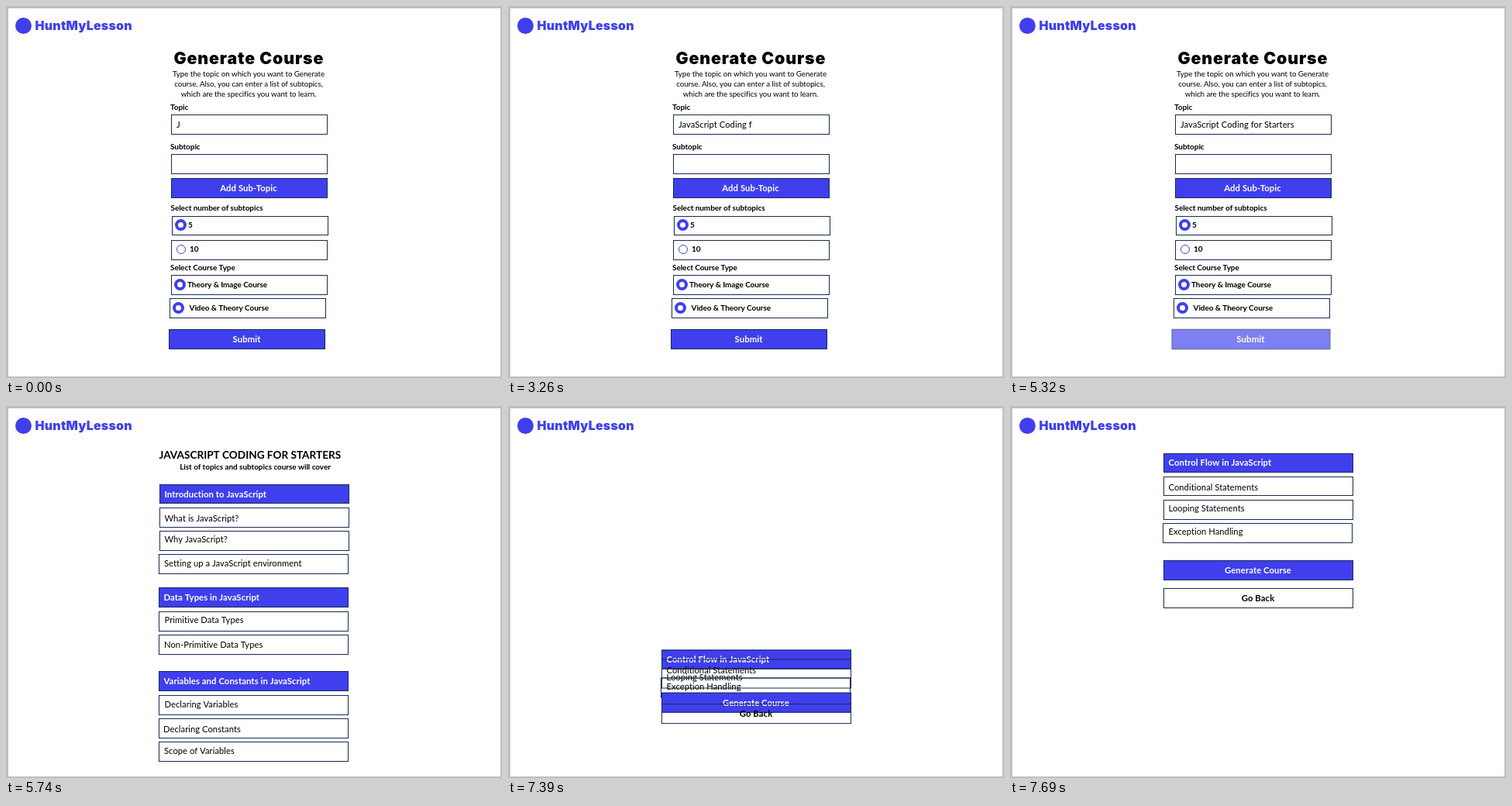
Write an HTML page with a canvas that moves like this. It is 640 by 480 pixels and loops after 8000 ms.

```html
<!DOCTYPE html>
<html lang="en">
<head>
<meta charset="utf-8">
<title>Course generator</title>
<style>
  html, body { margin: 0; width: 100%; height: 100%; overflow: hidden; background: #fff; }
  canvas { display: block; width: 640px; height: 480px; }
</style>
</head>
<body>
<canvas id="stage" width="640" height="480"></canvas>
<script>
const ctx = document.getElementById('stage').getContext('2d');
const LOOP = 8000;
const BLUE = '#3f3fee', NAVY = '#172c51', GREY = '#bfbfbf';
const BODY = 'Lato, sans-serif', HEAVY = 'Inter, sans-serif';
// Font and letter spacing
const FONT = {
  brand: ['900 16px ' + HEAVY, 0.2],
  heading: ['900 21.3px ' + HEAVY, 0.9],
  item: ['11.2px ' + BODY, 0.05],
  note: ['9.75px ' + BODY, -0.05],
  bold: ['bold 11.3px ' + BODY, 0.08],
  label: ['bold 10px ' + BODY, -0.06],
  title: ['bold 13.6px ' + BODY, 0]
};
const TOPIC = 'JavaScript Coding for Starters';

function text(str, x, y, font, color = '#000', align = 'left') {
  const [face, spacing] = FONT[font];
  ctx.font = face;
  ctx.letterSpacing = spacing + 'px';
  ctx.fillStyle = color;
  ctx.textAlign = align;
  ctx.fillText(str, x, y);
}

function box(x, y, w, h, fill) {
  if (fill) {
    ctx.fillStyle = fill;
    ctx.fillRect(x, y, w, h);
  }
  ctx.strokeStyle = NAVY;
  ctx.lineWidth = 1;
  ctx.strokeRect(x + 0.5, y + 0.5, w - 1, h - 1);
}

function ring(x, y, r, width) {
  ctx.strokeStyle = BLUE;
  ctx.lineWidth = width;
  ctx.beginPath();
  ctx.arc(x, y, r, 0, Math.PI * 2);
  ctx.stroke();
}

function page() {
  ctx.fillStyle = GREY;
  ctx.fillRect(0, 0, 640, 480);
  ctx.fillStyle = '#fff';
  ctx.fillRect(3, 3, 635, 475);
  ctx.fillStyle = BLUE;
  ctx.beginPath();
  ctx.arc(22.5, 25.5, 10.5, 0, Math.PI * 2);
  ctx.fill();
  text('HuntMyLesson', 37.5, 31, 'brand', BLUE);
}

// The first n letters of the topic; spaces come along for free.
function typed(n) {
  return TOPIC.match(new RegExp('(\\s*\\S){' + n + '}'))[0];
}

// One pulse: quick fade to half, hold, back, with a slight swell.
function submit(phase) {
  const fade = 0.5 * Math.min(1, phase / 0.2, (1 - phase) / 0.2);
  const scale = 1 + 0.05 * (1 - Math.abs(1 - 2 * phase));
  ctx.save();
  ctx.translate(311, 430);
  ctx.scale(scale, scale);
  ctx.translate(-311, -430);
  box(210, 417, 202, 26, BLUE);
  text('Submit', 310.5, 434, 'bold', '#fff', 'center');
  ctx.restore();
  ctx.fillStyle = `rgba(255,255,255,${fade})`;
  ctx.fillRect(200, 412, 222, 36);
}

function form(t) {
  text('Generate Course', 313.4, 75, 'heading', '#000', 'center');
  ['Type the topic on which you want to Generate',
   'course. Also, you can enter a list of subtopics,',
   'which are the specifics you want to learn.'
  ].forEach((line, i) => text(line, 313, 91 + 13 * i, 'note', '#000', 'center'));

  text('Topic', 212, 134, 'label');
  box(213, 140, 202, 26);
  text(typed(Math.max(1, Math.min(27, Math.floor((t - 260) / 200) + 2))), 220, 157, 'item');
  text('Subtopic', 212, 185, 'label');
  box(213, 191, 202, 26);
  box(213, 222, 202, 26, BLUE);
  text('Add Sub-Topic', 313, 239, 'bold', '#fff', 'center');

  text('Select number of subtopics', 212.5, 264, 'label');
  box(214, 271, 202, 25);
  ring(225.5, 282.5, 5.5, 4);
  text('5', 235, 286, 'label');
  box(213, 302, 202, 26);
  ring(226, 314, 5.5, 1);
  text('10', 237, 317, 'label');

  text('Select Course Type', 212, 341, 'label');
  box(213, 347, 202, 26);
  ring(224.5, 359.5, 5.5, 4);
  text('Theory & Image Course', 234, 363, 'label');
  box(211, 377, 202, 26);
  ring(222.5, 389.5, 5.5, 4);
  text('Video & Theory Course', 236.5, 393, 'label');

  submit(Math.max(0, Math.floor((t - 5260) / 60)) / 7.5);
}

// Rows: text, box left, box top, box height, text x, baseline, filled
const OUTLINE = [
  ['Introduction to JavaScript', 198, 101, 25, 204.5, 118, true],
  ['What is JavaScript?', 198, 131, 26, 204.5, 149],
  ['Why JavaScript?', 198, 161, 26, 204.5, 176],
  ['Setting up a JavaScript environment', 197, 191, 26, 204, 207],
  ['Data Types in JavaScript', 197, 234, 26, 203.5, 251, true],
  ['Primitive Data Types', 197, 265, 26, 204.5, 280],
  ['Non-Primitive Data Types', 197, 295, 26, 204, 312],
  ['Variables and Constants in JavaScript', 197, 342, 26, 203.5, 359, true],
  ['Declaring Variables', 197, 373, 26, 204.5, 389],
  ['Declaring Constants', 197, 403, 26, 203, 421],
  ['Scope of Variables', 197, 433, 26, 204, 449]
];
const ENDING = [
  ['Control Flow in JavaScript', 198, 61, 25, 204.5, 77, true],
  ['Conditional Statements', 198, 91, 25, 204.5, 109],
  ['Looping Statements', 198, 121, 26, 204.5, 136],
  ['Exception Handling', 197, 151, 26, 204.5, 166]
];

function row([str, left, top, height, x, base, filled], dy = 0) {
  box(left, top + dy, 245, height, filled && BLUE);
  text(str, x, base + dy, filled ? 'bold' : 'item', filled ? '#fff' : '#000');
}

function button(str, top, dy, fill, color) {
  box(198, top + dy, 245, 26, fill);
  text(str, 320, top + 17 + dy, 'bold', color, 'center');
}

function outline() {
  text(TOPIC.toUpperCase(), 197.5, 68, 'title');
  text('List of topics and subtopics course will cover', 321.5, 82, 'label', '#000', 'center');
  OUTLINE.forEach(r => row(r));
}

// All rows fly in from just below the stage, linearly, in the same time.
function ending(t) {
  const p = Math.min(1, Math.floor((t - 7210) / 60) / 7.5);
  const rise = top => (1 - p) * (483.5 - top);
  ENDING.forEach(r => row(r, rise(r[2])));
  button('Generate Course', 199, rise(199), BLUE, '#fff');
  button('Go Back', 235, rise(235), null, '#000');
}

let start;
function draw(now) {
  start ??= now;
  const t = (now - start) % LOOP;
  page();
  if (t < 5740) form(t);
  else if (t < 6870) outline();
  else if (t >= 7270) ending(t);
  requestAnimationFrame(draw);
}
requestAnimationFrame(draw);
</script>
</body>
</html>
```
